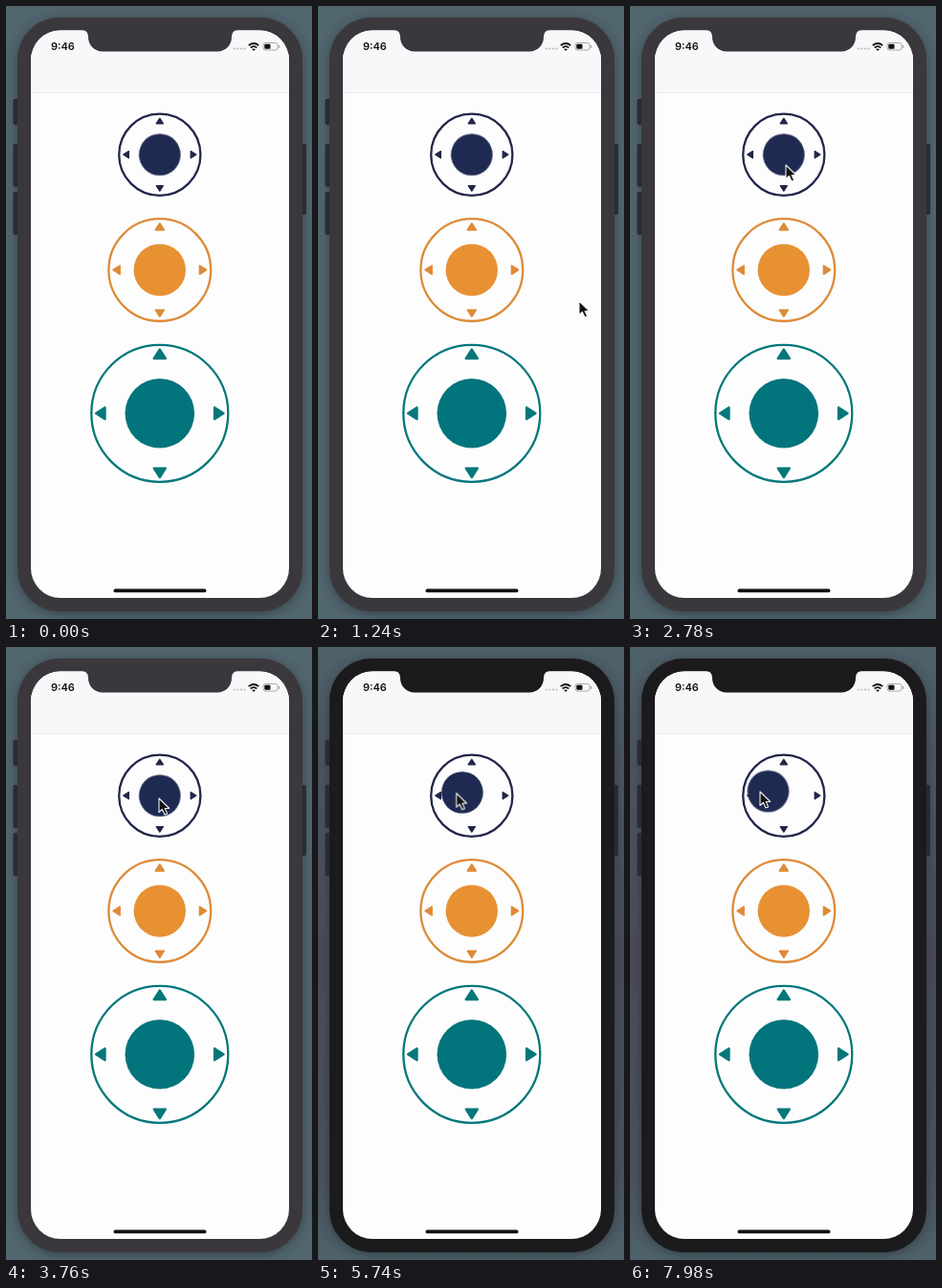
Animation of 320 by 640 pixels, one loop 8 s. Source, as an HTML page:

```html
<!DOCTYPE html>
<html lang="en">
<head>
<meta charset="utf-8">
<title>Joysticks</title>
<style>
  html, body { margin: 0; width: 100%; height: 100%; overflow: hidden; background: #52666f; }
  svg { display: block; width: 100vw; height: 100vh; }
  .navy { --ring: #22264a; --knob: #1f2a52; }
  .orange { --ring: #dd8b38; --knob: #e79133; }
  .green { --ring: #06777a; --knob: #02747c; }
  .ring { fill: none; stroke: var(--ring); stroke-width: 2.3; }
  .arrow { fill: var(--ring); stroke: var(--ring); stroke-linejoin: round; }
  .knob { fill: var(--knob); }
  .body { fill: #3a383c; animation: darken 8s linear infinite; }
  .dusk { opacity: 0; animation: dusk 8s linear infinite; }
  .cursor { animation: point 8s linear infinite; }
  .navy .knob { animation: drag 8s linear infinite; }
  .time { font: 600 11px Inter, Roboto, sans-serif; fill: #111; }

  @keyframes darken {
    0%, 48% { fill: #3a383c; }
    60%, 100% { fill: #1b1a1d; }
  }
  @keyframes dusk {
    0%, 48% { opacity: 0; }
    60%, 100% { opacity: 1; }
  }
  @keyframes point {
    0%, 10.5% { transform: translate(330px, 356px); }
    13% { transform: translate(294px, 322px); animation-timing-function: ease-out; }
    15.5% { transform: translate(273px, 308px); animation-timing-function: ease-in-out; }
    30% { transform: translate(166px, 171px); animation-timing-function: ease-out; }
    34.75% { transform: translate(163px, 166px); animation-timing-function: ease-in-out; }
    42%, 47% { transform: translate(160px, 158px); }
    61%, 64% { transform: translate(160px, 156px); animation-timing-function: ease-in-out; }
    77%, 85.5% { transform: translate(137px, 151px); }
    93%, 100% { transform: translate(136px, 151px); }
  }
  @keyframes drag {
    0%, 64% { transform: translate(0, 0); animation-timing-function: ease-in-out; }
    77%, 85.5% { transform: translate(-15px, -5px); }
    93%, 100% { transform: translate(-16.3px, -4.6px); }
  }
</style>
</head>
<body>
<svg viewBox="0 0 320 640" preserveAspectRatio="none">
  <defs>
    <filter id="blur" x="-20%" y="-20%" width="140%" height="140%">
      <feGaussianBlur stdDeviation="6"/>
    </filter>
    <linearGradient id="duskFill" x2="0" y2="1">
      <stop offset="0" stop-color="#4e626b"/>
      <stop offset=".2" stop-color="#4c555f"/>
      <stop offset=".5" stop-color="#4b4c59"/>
      <stop offset=".85" stop-color="#4b525c"/>
      <stop offset="1" stop-color="#4e626b"/>
    </linearGradient>
  </defs>

  <rect width="320" height="640" fill="#52666f"/>
  <rect class="dusk" width="320" height="640" fill="url(#duskFill)"/>
  <rect x="12" y="14" width="298" height="620" rx="46" fill="#2b3138" opacity=".75" filter="url(#blur)"/>

  <g fill="#2a2b33">
    <rect x="7.5" y="97" width="7" height="27" rx="2"/>
    <rect x="7.5" y="144" width="7" height="45" rx="2"/>
    <rect x="7.5" y="194" width="7" height="45" rx="2"/>
    <rect x="307" y="144" width="7" height="74" rx="2"/>
  </g>
  <rect class="body" x="12" y="12" width="298" height="620" rx="44"/>
  <rect x="26" y="25.5" width="270" height="592.5" rx="31" fill="#fdfdfe"/>
  <path d="M26 90.5V56.5a31 31 0 0 1 31-31H265a31 31 0 0 1 31 31V90.5Z" fill="#f8f8fb"/>
  <path d="M26 90.5H296" stroke="#ededf0"/>
  <path class="body" d="M80 25H242Q236 26 236 32A15 15 0 0 1 221 47.5H101A15 15 0 0 1 86 32Q86 26 80 25Z"/>

  <text class="time" x="47" y="46">9:46</text>
  <g fill="#b8b8ba">
    <circle cx="239" cy="44.5" r="1"/><circle cx="242.5" cy="44.5" r="1"/>
    <circle cx="246" cy="44.5" r="1"/><circle cx="249.5" cy="44.5" r="1"/>
  </g>
  <g fill="none" stroke="#111" stroke-width="1.7">
    <path d="M253.7 41.2Q259 36.8 264.3 41.2"/>
    <path d="M255.7 43.5Q259 40.8 262.3 43.5"/>
  </g>
  <path d="M257.2 45.1Q259 43.7 260.8 45.1L259 47Z" fill="#111"/>
  <rect x="269" y="38.5" width="15" height="7.5" rx="2.3" fill="none" stroke="#a9a9ac"/>
  <rect x="270.3" y="39.8" width="6.2" height="5" rx="1" fill="#111"/>
  <path d="M285.5 40.8v3" stroke="#a9a9ac" stroke-width="1.3"/>
  <rect x="112.5" y="608.5" width="97" height="3.8" rx="1.9" fill="#111"/>

  <g id="sticks"></g>

  <path class="cursor" d="M0 0V14.5L3.4 11.4L6 17L8.6 15.9L6.2 10.5H10.7Z"
        fill="#111" stroke="#f2f2f4" stroke-width="1.1" stroke-linejoin="round"/>
</svg>
<script>
  // name, centre y, ring radius, knob radius, arrow distance, arrow half width
  const sticks = [
    ['navy', 155.2, 42.6, 21.8, 35.2, 3.5],
    ['orange', 275.6, 53.4, 27.2, 45.2, 4.4],
    ['green', 425.3, 71.5, 36.3, 62, 6],
  ];

  const arrow = (distance, half, angle) => {
    const height = half * 0.78;
    return `<path class="arrow" transform="rotate(${angle}) translate(0 ${-distance})"
      stroke-width="${half * 0.4}" d="M0 ${-height}L${half} ${height}H${-half}Z"/>`;
  };

  document.getElementById('sticks').innerHTML = sticks.map(
    ([name, y, ring, knob, distance, half]) => `
      <g class="${name}" transform="translate(160.8 ${y})">
        <circle class="ring" r="${ring}"/>
        ${[0, 90, 180, 270].map(angle => arrow(distance, half, angle)).join('')}
        <circle class="knob" r="${knob}"/>
      </g>`
  ).join('');
</script>
</body>
</html>
```
